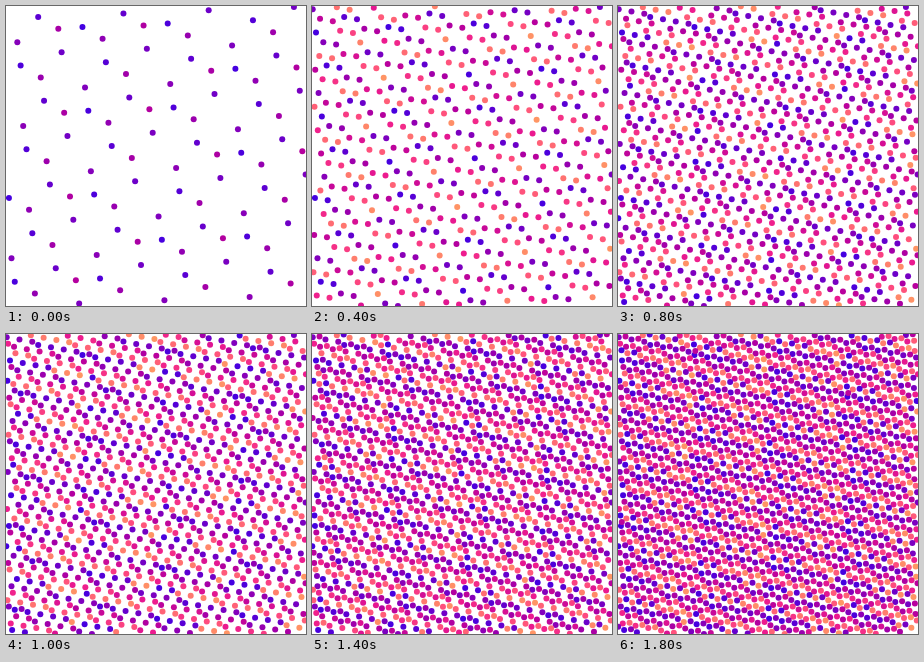
An HTML page that plays this animation: 300 by 300 pixels, repeating every 1900 ms.

```html
<!DOCTYPE html>
<html lang="en">
<head>
<meta charset="utf-8">
<title>Quasirandom dots</title>
<style>
  html, body { margin: 0; width: 100%; height: 100%; overflow: hidden; background: #fff; }
  svg { display: block; width: 100vw; height: 100vh; }
</style>
</head>
<body>
<svg id="stage" viewBox="0 0 300 300"></svg>
<script>
const NS = 'http://www.w3.org/2000/svg';
const SIZE = 300, RADIUS = 3;
const BATCHES = 19, PER_BATCH = 100, STEP = 100;
const CYCLE = 256;

// Additive recurrence based on the plastic number
const PLASTIC = 1.32471795724474602596;
const AX = 1 / PLASTIC, AY = AX * AX;

// Colour ramp: position, red, green, blue
const RAMP = [
  [0, 68, 0, 225],
  [0.39, 182, 0, 158],
  [0.6, 238, 28, 142],
  [0.75, 255, 80, 125],
  [1, 255, 150, 100]
];

function rampColor(t) {
  let k = 1;
  while (k < RAMP.length - 1 && t > RAMP[k][0]) k++;
  const a = RAMP[k - 1], b = RAMP[k];
  const u = (t - a[0]) / (b[0] - a[0]);
  const mix = c => Math.round(a[c] + (b[c] - a[c]) * u);
  return `rgb(${mix(1)},${mix(2)},${mix(3)})`;
}

function add(parent, name, attrs = {}) {
  const el = document.createElementNS(NS, name);
  for (const key in attrs) el.setAttribute(key, attrs[key]);
  return parent.appendChild(el);
}

function addDot(parent, i) {
  const place = a => ((0.5 + a * (i + 1)) % 1 * SIZE).toFixed(2);
  add(parent, 'circle', {
    cx: place(AX),
    cy: place(AY),
    r: RADIUS,
    fill: rampColor(i % CYCLE / (CYCLE - 1))
  });
}

const stage = document.getElementById('stage');
const batches = Array.from({ length: BATCHES }, (_, b) => {
  const group = add(stage, 'g');
  for (let j = 0; j < PER_BATCH; j++) addDot(group, b * PER_BATCH + j);
  return group;
});

let shown = -1;
function render(ms) {
  const last = Math.floor(ms % (BATCHES * STEP) / STEP);
  if (last === shown) return;
  shown = last;
  batches.forEach((group, b) => group.setAttribute('display', b <= last ? 'inline' : 'none'));
}

const start = performance.now();
function tick() {
  render(performance.now() - start);
  requestAnimationFrame(tick);
}
tick();
</script>
</body>
</html>
```
